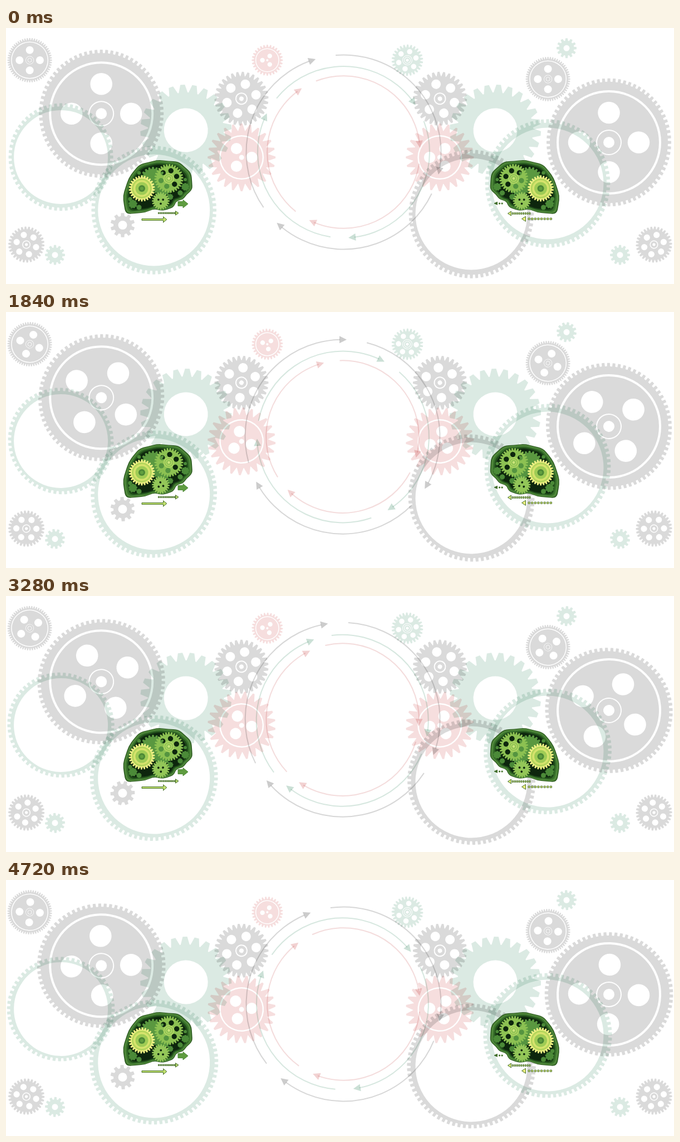
An HTML page with a canvas for the animation above (4.8 s loop, 1200 px wide and 461 px high).

```html
<!DOCTYPE html>
<html lang="en">
<head>
<meta charset="utf-8">
<title>Turning gears</title>
<style>
  html, body { margin: 0; width: 100%; height: 100%; overflow: hidden; background: #fff; }
  canvas { display: block; }
</style>
</head>
<body>
<canvas id="stage" width="1200" height="461"></canvas>
<script>
const ctx = document.getElementById('stage').getContext('2d');
const TAU = Math.PI * 2;
const RAD = Math.PI / 180;
const LOOP = 4800, STEP = 80;
const GREY = '#dadada', GREEN = '#dbeae3', PINK = '#f6dede';

// Toothed outline; base and top are the tooth widths as parts of one pitch.
function teeth(p, n, root, tip, base, top, stretch = 1) {
  const pitch = TAU / n;
  for (let i = 0; i < n; i++) {
    const corners = [[-base, root], [-top, tip], [top, tip], [base, root]];
    corners.forEach(([w, r], k) => {
      const a = (i + w / 2) * pitch;
      const x = r * Math.sin(a), y = -r * Math.cos(a) * stretch;
      i || k ? p.lineTo(x, y) : p.moveTo(x, y);
    });
  }
  p.closePath();
}

function disc(p, x, y, r) {
  p.moveTo(x + r, y);
  p.arc(x, y, r, 0, TAU);
}

function holes(p, n, dist, r, first = 0) {
  for (let i = 0; i < n; i++) {
    const a = first * RAD + i * TAU / n;
    disc(p, dist * Math.sin(a), -dist * Math.cos(a), r);
  }
}

function rings(p, radii) {
  radii.forEach(r => disc(p, 0, 0, r));
}

function shape(build) {
  const p = new Path2D();
  build(p);
  return p;
}

const ringShape = (n, root, tip, inner) => shape(p => {
  teeth(p, n, root, tip, .6, .5, 1.03);
  rings(p, [inner]);
});

const shapes = {
  big: shape(p => {
    teeth(p, 72, 106, 112, .6, .5, 1.03);
    rings(p, [94, 90, 23, 21, 10]);
    holes(p, 4, 53.5, 19.8);
  }),
  ring: ringShape(72, 106, 112.3, 100.5),
  smallRing: ringShape(60, 88.5, 94, 84.5),
  cog: shape(p => {
    teeth(p, 24, 68, 82, .9, .38);
    rings(p, [39.5]);
  }),
  six: shape(p => {
    teeth(p, 30, 40.5, 48.5, .9, .35);
    rings(p, [11, 9, 4]);
    holes(p, 6, 27, 8.5);
  }),
  sixSmall: shape(p => {
    teeth(p, 30, 27.5, 32.5, .85, .4);
    rings(p, [7.5, 6, 2.6]);
    holes(p, 6, 18, 5.6);
  }),
  sixMini: shape(p => {
    teeth(p, 26, 23, 28.3, .85, .35);
    rings(p, [9, 8, 6, 5, 2.5]);
    holes(p, 6, 16, 4.8);
  }),
  four: shape(p => {
    teeth(p, 56, 36, 40, .8, .4);
    rings(p, [33.5, 32, 7.5, 6.8, 3.8, 3]);
    holes(p, 4, 18.3, 7);
  }),
  three: shape(p => {
    teeth(p, 24, 48, 61, .95, .2);
    rings(p, [40, 37.5, 4.5]);
    holes(p, 3, 18.3, 10.2, 90);
  }),
  threeMini: shape(p => {
    teeth(p, 28, 23.5, 28, .85, .3);
    rings(p, [21.5, 20, 2]);
    holes(p, 3, 8.8, 4.2, 30);
  }),
  nut: shape(p => {
    teeth(p, 10, 16.5, 22, .65, .42);
    rings(p, [8]);
  }),
  tiny: shape(p => {
    teeth(p, 12, 13.5, 18, .7, .42);
    rings(p, [5.5]);
  })
};

// shape, colour, x, y, degrees per loop, starting angle
const gears = [
  ['big', GREY, 171.2, 154.3, 90, 0],
  ['big', GREY, 1083, 206, -90, 0],
  ['smallRing', GREEN, 98.6, 232.4, -90, 0],
  ['ring', GREEN, 265.7, 328, 90, 0],
  ['ring', GREY, 836, 335, -90, 0],
  ['ring', GREEN, 973, 280, 90, 0],
  ['cog', GREEN, 323.2, 184, -180, -4.2],
  ['cog', GREEN, 879, 184, 180, 4.2],
  ['six', GREY, 423, 127.3, -180, 15],
  ['six', GREY, 779.5, 127.3, 180, -15],
  ['three', PINK, 423.2, 233, 360, 0],
  ['three', PINK, 779.3, 233, -360, 180],
  ['four', GREY, 42.6, 58, -180, 0],
  ['four', GREY, 973.6, 92, -180, 0],
  ['threeMini', PINK, 469.4, 58, 360, 0],
  ['sixMini', GREEN, 721, 58, 360, 15],
  ['sixSmall', GREY, 36.6, 390, 120, -15],
  ['sixSmall', GREY, 1164, 390, -120, 15],
  ['nut', GREY, 209.5, 355, 180, 0],
  ['tiny', GREEN, 88, 408.7, -180, 0],
  ['tiny', GREEN, 1103, 408.7, 180, 0],
  ['tiny', GREEN, 1007, 36.3, 180, 0]
];

// radius, degrees per loop, angle of the first arrow tip, line, head
const orbits = [
  [175, 363, 103.3, '#d7d7d7', '#cccccc'],
  [154.5, 240, 56.8, '#d6e7df', '#cbe0d6'],
  [137.3, 363, 86.8, '#f4dcdc', '#f2d2d2']
];

function at(x, y, angle, draw) {
  ctx.save();
  ctx.translate(x, y);
  ctx.rotate(angle * RAD);
  draw();
  ctx.restore();
}

function drawOrbit([r, turn, tip, line, head], part) {
  at(605.3, 223.7, turn * part, () => {
    ctx.translate(1.2, -.2);
    ctx.lineWidth = 2;
    for (let i = 0; i < 3; i++) {
      const end = tip + i * 120 - 90;
      ctx.strokeStyle = line;
      ctx.beginPath();
      ctx.arc(0, 0, r, (end - 108) * RAD, (end - 4) * RAD);
      ctx.stroke();
      ctx.save();
      ctx.rotate(end * RAD);
      ctx.translate(r, 0);
      ctx.rotate(-2.5 * RAD);
      ctx.fillStyle = head;
      ctx.fill(new Path2D('M0 0L-6.5-13H6.5Z'));
      ctx.restore();
    }
  });
}

const OUTLINE = [
  [217, 334], [211, 318], [212, 302], [214, 287], [222, 271], [229, 257], [241, 247],
  [256, 241], [273, 239], [292, 239], [309, 242], [322, 250], [331, 262], [335, 278],
  [333, 291], [325, 300], [317, 308], [306, 312], [301, 321], [291, 327], [279, 328],
  [266, 326], [251, 331], [235, 334]
];

// Every other point sits a little further out, which makes the edge wavy.
const brain = shape(p => {
  const pts = OUTLINE.map(([x, y], i) => {
    const k = i % 2 ? .99 : 1.035;
    return [(x - 273) * k, (y - 287) * k];
  });
  const mid = (a, b) => [(a[0] + b[0]) / 2, (a[1] + b[1]) / 2];
  p.moveTo(...mid(pts.at(-1), pts[0]));
  pts.forEach((pt, i) => p.quadraticCurveTo(...pt, ...mid(pt, pts[(i + 1) % pts.length])));
  p.closePath();
});

const BRAIN_LAYERS = [
  [1, '#2c5a20'], [.975, '#4f873a'], [.925, '#37702a'], [.88, '#1f4a19'], [.83, '#0d260d']
];

const plainCog = (n, r) => shape(p => teeth(p, n, r * .84, r, .8, .4));

const inner = {
  back: plainCog(20, 23),
  small: plainCog(9, 8),
  yellow: plainCog(26, 23.5),
  light: shape(p => {
    teeth(p, 30, 22, 26, .85, .4);
    holes(p, 6, 14.5, 4.7);
  }),
  lower: shape(p => {
    teeth(p, 20, 12.5, 16, .85, .4);
    holes(p, 3, 4.8, 1.9, 60);
  })
};

// x, y, scale of the little dark cogs
const SEEDS = [
  [228, 317, 1], [322, 286, .9], [313, 297, .62], [239, 323, .6],
  [223, 308, .5], [239, 261, .45], [322, 273, .4], [295, 304, .7]
];

function cog(path, color, x, y, angle, scale = 1) {
  at(x, y, angle, () => {
    ctx.scale(scale, scale);
    ctx.fillStyle = color;
    ctx.fill(path, 'evenodd');
  });
}

function circles(x, y, list) {
  list.forEach(([r, color]) => {
    ctx.fillStyle = color;
    ctx.beginPath();
    ctx.arc(x, y, r, 0, TAU);
    ctx.fill();
  });
}

function drawBrain(part) {
  BRAIN_LAYERS.forEach(([k, color]) => cog(brain, color, 273, 287, 0, k));
  SEEDS.forEach(([x, y, k]) => cog(inner.small, '#4b8a38', x, y, 0, k));
  cog(inner.back, '#5a9840', 264, 273, 0);
  cog(inner.back, '#559440', 281, 286, 0, .78);

  cog(inner.light, '#8cc152', 292.5, 271, 15 - 180 * part);
  circles(292.5, 271, [
    [9.5, '#b8d968'], [8, '#8cc152'], [6, '#b8d968'], [4.5, '#8cc152'], [2.4, '#c9e47a']
  ]);

  cog(inner.yellow, '#eef083', 244, 289, -180 * part);
  circles(244, 289, [
    [18, '#b5d65c'], [15, '#d6e36d'], [11.5, '#9fcc55'], [6, '#4d8836'], [3, '#62a040']
  ]);

  cog(inner.lower, '#93c658', 278, 311.5, -180 * part);
}

function outlined(path, color, edge = '#456f2c') {
  const p = new Path2D(path);
  ctx.fillStyle = color;
  ctx.strokeStyle = edge;
  ctx.lineWidth = 1;
  ctx.fill(p);
  ctx.stroke(p);
}

function dashes(x, y, n, gap, w, h, color) {
  for (let i = 0; i < n; i++) outlined(`M${x + i * gap} ${y}h${w}v${h}h${-w}z`, color);
}

function drawArrows() {
  outlined('M309 312.5h9v-3l9 7.2-9 7.2v-3.4h-9z', '#5f9c40', '#4f8a38');
  dashes(273.5, 332, 11, 2.9, 1.4, 2.6, '#b5d36a');
  outlined('M304.5 329.5l5.5 3.8-5.5 3.8z', '#b5d36a');
  outlined('M244 343.6h38.5v-3.8l6.3 5.1-6.3 5.3v-3.8H244z', '#c4e26f');

  outlined('M877 315.8l5.5-2.5v5z', '#3f6f2c');
  dashes(885.5, 315, 2, 4.6, 2, 2, '#5f9c40');
  outlined('M901.5 334l6-4v8z', '#dcea7c');
  dashes(909.5, 332.5, 9, 3.8, 2, 3, '#cfe07a');
  outlined('M926.5 343.6l7-4.3v9z', '#f0f07e');
  dashes(938, 342.2, 8, 5.6, 3.2, 3, '#e6ec7e');
}

function draw(part) {
  ctx.globalCompositeOperation = 'source-over';
  ctx.fillStyle = '#fff';
  ctx.fillRect(0, 0, 1200, 461);

  ctx.globalCompositeOperation = 'multiply';
  gears.forEach(([name, color, x, y, turn, start]) =>
    cog(shapes[name], color, x, y, start + turn * part));
  orbits.forEach(o => drawOrbit(o, part));

  ctx.globalCompositeOperation = 'source-over';
  drawBrain(part);
  ctx.save();
  ctx.translate(1204.5, 0);
  ctx.scale(-1, 1);
  drawBrain(part);
  ctx.restore();
  drawArrows();
}

const begin = performance.now();
function tick() {
  const t = (performance.now() - begin) % LOOP;
  draw(Math.floor(t / STEP) * STEP / LOOP);
  requestAnimationFrame(tick);
}
tick();
</script>
</body>
</html>
```
